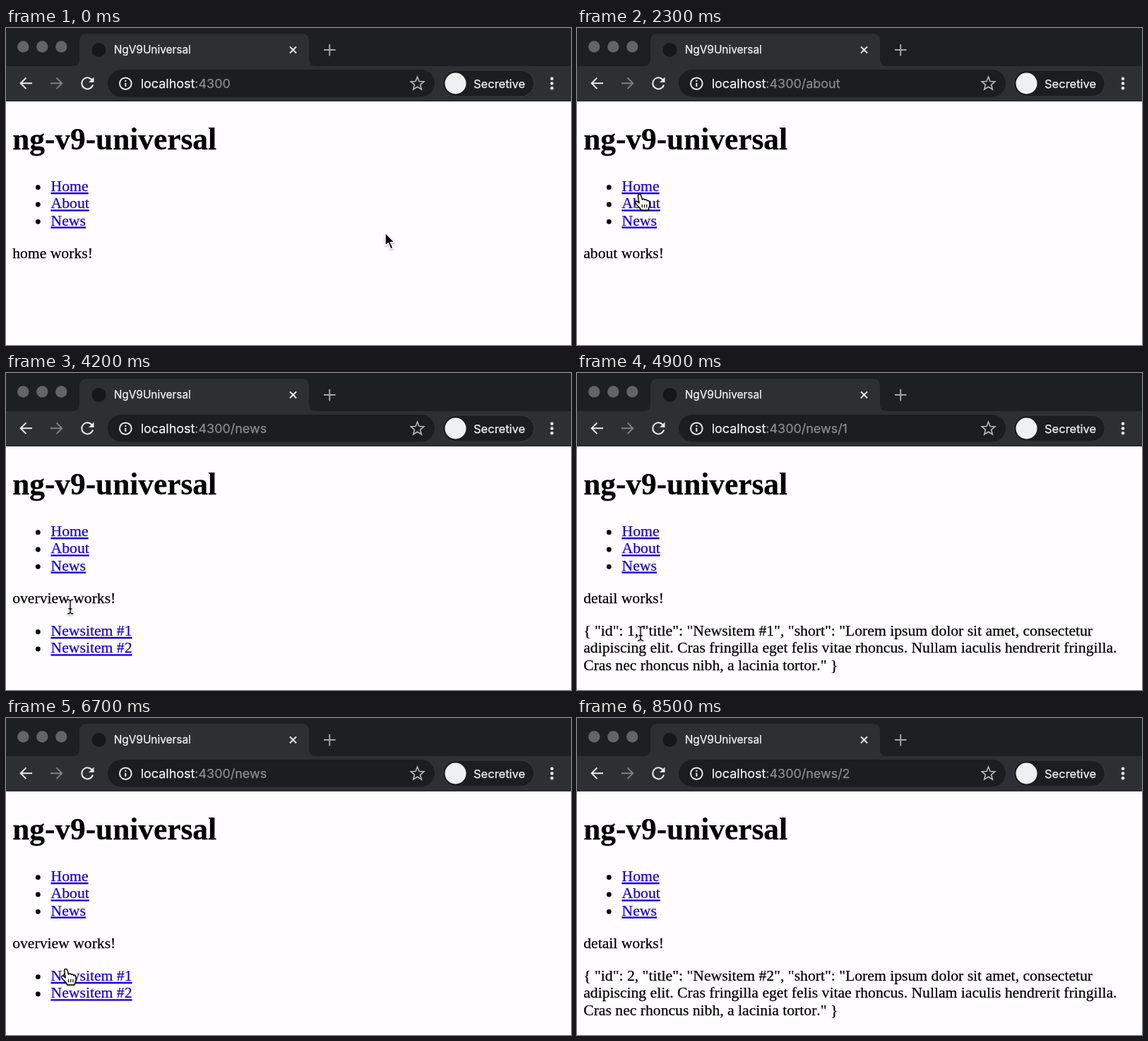
An HTML page that plays this animation: 800x449 px, repeating every 9.4 s.

```html
<!DOCTYPE html>
<html lang="en">
<head>
<meta charset="utf-8">
<title>ng-v9-universal</title>
<style>
  html, body { margin: 0; width: 100%; height: 100%; overflow: hidden; background: #fffdff; }
  svg { display: block; width: 800px; height: 449px; }
  text, tspan { fill: currentColor; stroke: currentColor; stroke-width: .25; }
  .ui { font-family: Inter, Roboto, sans-serif; color: #f1f2f4; }
  .page { font: 21.66px "Liberation Serif", Times, serif; font-kerning: none; color: #000; }
  .title { font-size: 43.32px; font-weight: bold; }
  .link { color: #1a00d2; text-decoration: underline; }
  .link.pressed { color: #d8101c; }
  #path { color: #8b8d91; }
  .line { fill: none; stroke: #e9eaed; stroke-width: 2; }
  .dim { stroke: #7d7f83; }
  .hidden { display: none; }
</style>
</head>
<body>
<svg viewBox="0 0 800 449">
  <!-- Browser window -->
  <rect width="800" height="55" fill="#1d1f22"/>
  <rect y="54" width="800" height="50" fill="#2e2f33"/>
  <rect y="103" width="800" height="1" fill="#26272b"/>
  <path d="M94 54Q104 54 104 44V19Q104 8 115 8H418Q429 8 429 19V44Q429 54 439 54Z" fill="#2e2f33"/>
  <g fill="#636467">
    <circle cx="24.3" cy="26.500" r="8.200"/>
    <circle cx="51.300" cy="26.500" r="8.200"/>
    <circle cx="78.300" cy="26.500" r="8.200"/>
  </g>
  <circle cx="131.500" cy="31" r="10" fill="#16171a"/>
  <path class="line" d="M402 26.500L411 35.500M411 26.500L402 35.500"/>
  <path class="line" style="stroke:#a2a4a7" d="M450 31H466.500M458.200 23V39.500"/>

  <path class="line" d="M37 78.300H21M28.500 70.500L20.700 78.300L28.500 86.100"/>
  <path class="line dim" d="M63 78.300H79M71.500 70.500L79.300 78.300L71.500 86.100"/>
  <path class="line" d="M122.300 74.500A8 8 0 1 0 123 80.500"/>
  <path d="M124.500 69.500V77H117Z" fill="#e9eaed"/>

  <rect x="144" y="59" width="463" height="38.500" rx="19.250" fill="#1c1d20"/>
  <circle class="line" cx="169.300" cy="78.700" r="8.300"/>
  <path class="line" d="M169.300 77.800V83M169.300 74V76"/>
  <path id="star" class="line" style="stroke:#b9bbbe;stroke-width:1.6"/>
  <rect x="618.500" y="60" width="129" height="37" rx="18.500" fill="#1c1d20" stroke="#3b3c40"/>
  <circle cx="636.500" cy="78.500" r="15" fill="#eff0f2"/>
  <g fill="#e9eaed">
    <circle cx="773" cy="71.800" r="2.300"/>
    <circle cx="773" cy="78.500" r="2.300"/>
    <circle cx="773" cy="85.200" r="2.300"/>
  </g>
  <g class="ui">
    <text x="152.700" y="36.200" font-size="15.4">NgV9Universal</text>
    <text x="190.700" y="85" font-size="17.95">localhost<tspan id="path"></tspan></text>
    <text x="662" y="85" font-size="16.5">Secretive</text>
  </g>

  <!-- Page -->
  <g class="page">
    <text class="title" x="9.200" y="172">ng-v9-universal</text>
    <g id="menu"></g>
    <text id="message" x="9.200" y="326"></text>
    <g id="items"></g>
    <g id="detail">
      <text id="summary" x="9.200" y="372"></text>
      <text x="9.200" y="396.300">adipiscing elit. Cras fringilla eget felis vitae rhoncus. Nullam iaculis hendrerit fringilla.</text>
      <text x="9.200" y="420.600">Cras nec rhoncus nibh, a lacinia tortor." }</text>
    </g>
  </g>

  <!-- Pointer, with its hot spot at 0,0 -->
  <g id="pointer" stroke-linejoin="round" style="filter:drop-shadow(0 1px 1px #0005)">
    <path id="arrow" d="M0 0V18.600L4.300 14.600L7.700 23L11 21.600L7.500 13.500H13.200Z" stroke="#fff" stroke-width="1.500"/>
    <g id="hand" stroke="#000" stroke-width="1.400" fill="#fff">
      <path d="M-2.600 .8C-2.900 -1.900 .9 -2.400 1.700 .4L3.400 6.200C4.200 4.600 6.600 4.800 7 6.600C8.200 5.400 10.200 6 10.400 7.800C12 7 13.800 8 13.800 10V14C13.800 17 12 18 11.800 21H1.600C1 18 -2.400 15.600 -4.400 13.400C-6 11.400 -7.600 10 -6.400 8.600C-5 7.200 -2.800 9 -1 11Z"/>
      <path d="M3.300 13V17.500M6.500 13V17.500M9.700 13V17.500" stroke-width="1.200"/>
    </g>
    <g id="beam" fill="none">
      <path id="halo" stroke="#fff" stroke-width="3"/>
      <path id="core" stroke="#000" stroke-width="1.400"/>
    </g>
  </g>
</svg>
<script>
const LOOP = 9400, STEP = 100, LINE = 24.3;
const $ = id => document.getElementById(id);
const show = (id, on) => $(id).classList.toggle('hidden', !on);

$('star').setAttribute('d', 'M' + Array.from({ length: 10 }, (_, i) => {
  const r = i % 2 ? 4.3 : 9.8, a = i * Math.PI / 5 - Math.PI / 2;
  return [(582.5 + r * Math.cos(a)).toFixed(1), (79 + r * Math.sin(a)).toFixed(1)];
}).join('L') + 'Z');

const beam = 'M-4 -10Q0 -10 0 -7V7Q0 10 -4 10M4 -10Q0 -10 0 -7V7Q0 10 4 10M-2.500 3H2.500';
for (const id of ['halo', 'core']) $(id).setAttribute('d', beam);

function addList(id, labels, y) {
  $(id).innerHTML = labels.map((label, i) => {
    const base = y + i * LINE;
    return `<circle cx="45.3" cy="${base - 5.3}" r="3.4"/><text class="link" x="63.6" y="${base}">${label}</text>`;
  }).join('');
  return [...$(id).querySelectorAll('.link')].map((el, i) => ({ el, id, y: y + i * LINE }));
}
const links = [
  ...addList('menu', ['Home', 'About', 'News'], 231),
  ...addList('items', ['Newsitem #1', 'Newsitem #2'], 372)
];

// [start time, address, message, detail number]
const visits = [
  [0, '', 'home'],
  [1900, '/about', 'about'],
  [2800, '', 'home'],
  [3700, '/news', 'overview'],
  [4600, '/news/1', 'detail', 1],
  [6300, '/news', 'overview'],
  [7100, '/news/2', 'detail', 2]
];

// Pointer route: [time, x, y]
const route = [
  [0, 537, 290], [100, 390, 200], [200, 200, 153], [300, 27, 290], [400, 27, 290],
  [900, 93, 221], [1200, 93, 222], [1700, 92, 250], [2100, 92, 250], [2300, 89, 237],
  [2600, 88, 224], [2900, 88, 224], [3500, 85, 275], [3800, 85, 277], [4200, 91, 331],
  [4500, 91, 367], [4700, 91, 367], [4900, 90, 369], [5400, 90, 369], [6000, 83, 277],
  [6300, 83, 277], [6900, 86, 385], [7900, 86, 385], [8000, 190, 349], [8100, 298, 326],
  [8200, 298, 326], [8300, 470, 235], [8400, 710, 82]
];
const GONE = 8500;

function pointerAt(t) {
  const i = route.findIndex(p => p[0] > t);
  if (i < 0) return route[route.length - 1].slice(1);
  const [t0, x0, y0] = route[i - 1], [t1, x1, y1] = route[i];
  const u = (t - t0) / (t1 - t0), k = u * u * (3 - 2 * u);
  return [x0 + (x1 - x0) * k, y0 + (y1 - y0) * k];
}

function linkAt(x, y, hasItems) {
  return links.find(l => (l.id === 'menu' || hasItems) && x > 63 &&
    x < (l.id === 'menu' ? 118 : 179) && y > l.y - 19 && y <= l.y + 5.3);
}

function overText(x, y, message, detail) {
  const within = (right, top, bottom) => x > 8 && x < right && y > top && y < bottom;
  return within(298, 136, 182) || within(message === 'overview' ? 156 : 124, 306, 332) ||
    (detail && within(765, 353, 427));
}

function draw(time) {
  const t = Math.floor(time % LOOP / STEP) * STEP;
  const [, address, message, detail] = visits.filter(v => v[0] <= t).pop();
  const hasItems = message === 'overview';

  $('path').textContent = ':4300' + address;
  $('message').textContent = message + ' works!';
  show('items', hasItems);
  show('detail', detail);
  if (detail) {
    $('summary').textContent =
      `{ "id": ${detail}, "title": "Newsitem #${detail}", "short": "Lorem ipsum dolor sit amet, consectetur`;
  }

  const [x, y] = pointerAt(t);
  const link = linkAt(x, y, hasItems);
  const pressing = visits.some(v => v[0] === t + STEP);
  for (const l of links) l.el.classList.toggle('pressed', pressing && l === link);

  const kind = link ? 'hand' : overText(x, y, message, detail) ? 'beam' : 'arrow';
  for (const id of ['arrow', 'hand', 'beam']) show(id, id === kind);
  show('pointer', t < GONE);
  $('pointer').setAttribute('transform', `translate(${x.toFixed(1)} ${y.toFixed(1)})`);
}

const start = performance.now();
function tick() {
  draw(performance.now() - start);
  requestAnimationFrame(tick);
}
tick();
</script>
</body>
</html>
```
